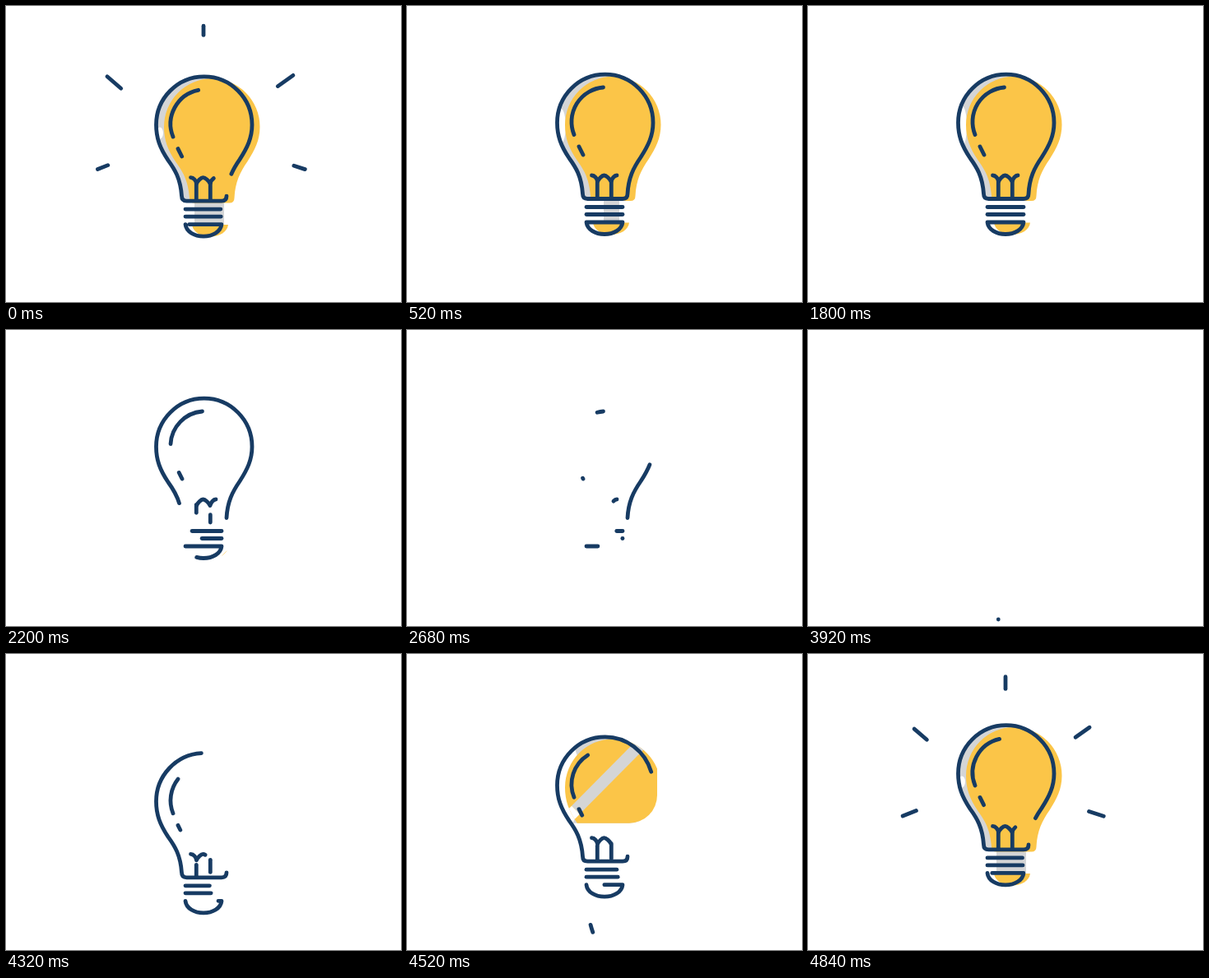
An HTML page that plays this animation: 480 px wide and 360 px high, repeating every 4880 ms.

```html
<!DOCTYPE html>
<html lang="en">
<head>
<meta charset="utf-8">
<title>Light bulb</title>
<style>
  html, body { margin: 0; width: 100%; height: 100%; overflow: hidden; background: #fff; }
  svg { display: block; width: 100vw; height: 100vh; }
  .ink { fill: none; stroke: #173b63; stroke-width: 4.8; stroke-linecap: round; stroke-linejoin: round; }
  .gray { fill: #d4d5d6; }
  .yellow { fill: #fbc548; }
  .white { fill: #fff; }
</style>
</head>
<body>
<svg viewBox="0 0 480 360">
  <defs>
    <path id="glass" d="M268 228.5Q268 234.5 262 234.5H219.5Q213.5 234.5 213.5 228.5C212 207 205 196 197 185C187 170 182.5 158 182.5 142A58.25 58.8 0 0 1 299 142C299 158 293 170 284 184C275 197 269 209 268 228.5"/>
    <path id="cap" d="M218 263C219 272 229 277.5 240 277.5S261 272 262 263H218"/>
    <clipPath id="wipe"><rect id="wipeBox" x="170" y="70" rx="34"/></clipPath>
    <clipPath id="inGlass"><use href="#glass" x="9.5" y="2.5"/></clipPath>
  </defs>
  <g id="bulb">
    <g id="fill">
      <g clip-path="url(#wipe)">
        <use href="#glass" class="gray"/>
        <rect id="neck" class="gray" y="235" height="27"/>
        <ellipse id="gap" class="white" cx="187"/>
        <use href="#glass" class="yellow" x="9.5" y="2.5"/>
        <use href="#cap" class="yellow" x="8" y="0.5"/>
        <g id="stripe" clip-path="url(#inGlass)">
          <path d="M300 76L205 172" stroke="#d4d5d6"/>
          <path d="M205 172L185 192" stroke="#fff"/>
        </g>
      </g>
      <path id="cover" class="white"/>
    </g>
    <g id="lines" class="ink"></g>
  </g>
  <g id="rays" class="ink"></g>
</svg>
<script>
const LOOP = 4880, STEP = 40, OUT = 1800, IN = 3920;
const $ = id => document.getElementById(id);
const clamp = v => Math.min(1, Math.max(0, v));
const span = (t, from, length) => clamp((t - from) / length);
const mix = (a, b, v) => a + (b - a) * v;
const easeOut = (u, n) => 1 - (1 - u) ** n;
const easeInOut = (u, n) => u < .5 ? (2 * u) ** n / 2 : 1 - (2 - 2 * u) ** n / 2;

function addPath(parent, d) {
  const path = document.createElementNS('http://www.w3.org/2000/svg', 'path');
  path.setAttribute('d', d);
  path.setAttribute('pathLength', 1);
  parent.append(path);
  return path;
}

function trim(path, from, to) {
  const shown = to - from > .001;
  path.style.visibility = shown ? 'visible' : 'hidden';
  if (!shown) return;
  path.style.strokeDasharray = `${to - from} 3`;
  path.style.strokeDashoffset = -from;
}

function set(id, attrs) {
  for (const name in attrs) $(id).setAttribute(name, attrs[name]);
}

// pow: speed of drawing; lead: speed of erasing; min: length before drawing
const lines = [
  { d: $('glass').getAttribute('d') },
  { d: $('cap').getAttribute('d'), pow: 2.95, lead: 1.1 },
  { d: 'M218 244.5H262', pow: 3.5 },
  { d: 'M218 253.5H262', pow: 3.9, lead: 3 },
  { d: 'M203 156.5A42 42 0 0 1 238.5 99', lead: 1.3 },
  { d: 'M209 171L214 181', lead: 1.4 },
  { d: 'M224.5 206C228 206 231 210 231.5 213.5C233 210 237 206 239.5 206S246.5 210 248 213.5C249 210 252 206 255 206', lead: 1.25 },
  { d: 'M231.3 234V213', pow: 4, lead: 4, min: .002 },
  { d: 'M248.3 213V234', pow: 4, lead: 4 }
].map(line => ({ pow: 2.63, lead: 1, min: 0, ...line, path: addPath($('lines'), line.d) }));

const rays = [
  { d: 'M240 62V22', start: 4660, time: 288, lag: 1.52 },
  { d: 'M153 182L109 199.5', start: 4660, time: 288, lag: 1.52 },
  { d: 'M318 184L366 199.5', start: 4660, time: 288, lag: 1.52 },
  { d: 'M158 116L103.5 69', start: 4697, time: 455, lag: 1.2 },
  { d: 'M310 112L370.5 69', start: 4697, time: 455, lag: 1.2 }
].map(ray => ({ ...ray, path: addPath($('rays'), ray.d) }));

const trail = addPath($('rays'), 'M231 352Q225 338 222 325');

function drawFill(t, entering) {
  const wipe = entering ? span(t, 4440, 200) : 1;
  const leave = entering ? 0 : span(t, OUT, 500);
  $('fill').style.display = wipe > 0 && leave < 1 ? '' : 'none';
  set('wipeBox', { width: 120 + 35 * wipe, height: 50 + 170 * wipe });
  set('stripe', { 'stroke-width': entering ? 14 * (1 - span(t, 4520, 120)) : 0 });

  const settle = entering ? span(t, LOOP, 520) : 1;
  const left = 229 + 10 * settle;
  set('neck', { x: left, width: entering ? 265 - 7 * settle - left : 0 });

  // the white gap closes while the bulb fills, then opens a little again
  const close = entering ? span(t, 4520, 280) : 1;
  set('gap', {
    cy: mix(140, 152 - 6 * settle, close),
    rx: mix(24, 4 + 2 * settle, close),
    ry: mix(60, entering ? 7 + 14 * settle : 25, close)
  });

  const s = 270 + 290 * easeInOut(leave, 2);
  set('cover', { d: leave > 0 ? `M0 0H${s}L0 ${s}Z` : '' });
}

function render(now) {
  let t = Math.floor(now % LOOP / STEP) * STEP;
  if (t < OUT) t += LOOP;
  const entering = t >= IN;
  const u = entering ? span(t, IN, 1480) : 1;
  const gone = entering ? 0 : easeInOut(span(t, OUT, 1260), 2.2);

  set('bulb', { transform: `translate(0 ${118 * (1 - u) ** 3.65})` });
  drawFill(t, entering);

  for (const { path, pow, lead, min } of lines) {
    trim(path, easeOut(gone, lead), Math.max(min, easeOut(u, pow)));
  }
  for (const { path, start, time, lag } of rays) {
    const v = span(t, start, time);
    trim(path, v ** lag, easeOut(v, 2));
  }
  trim(trail, span(t, 4476, 86), span(t, 4426, 112));
}

function tick() {
  render(performance.now());
  requestAnimationFrame(tick);
}
tick();
</script>
</body>
</html>
```
